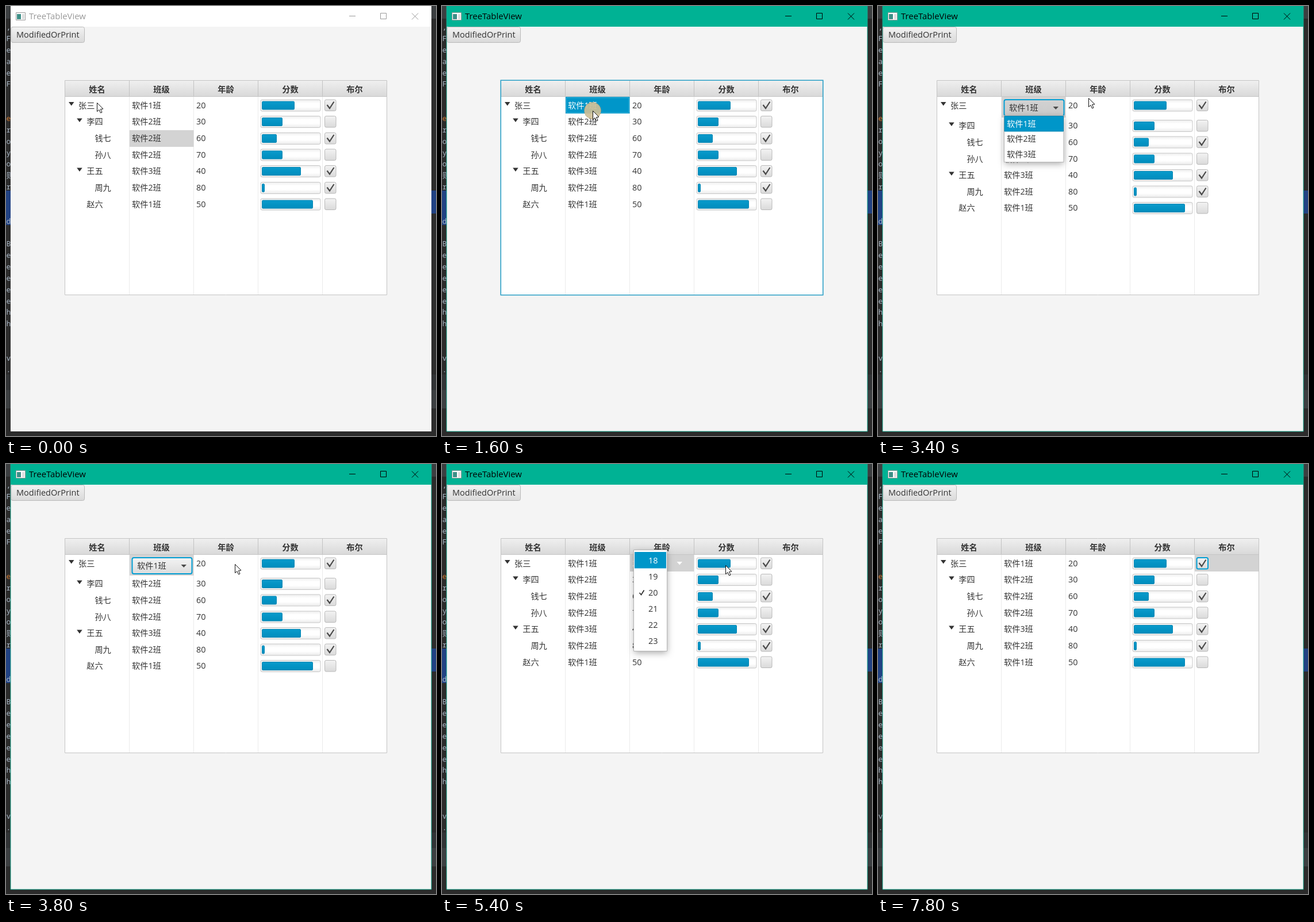
Animation of 748 by 748 pixels, one loop 8.4 s. Source, as an HTML page with a canvas:

```html
<!DOCTYPE html>
<html lang="zh-CN">
<head>
<meta charset="utf-8">
<title>TreeTableView</title>
<style>
html, body { margin: 0; width: 100%; height: 100%; overflow: hidden; background: #2b2b2b; }
canvas { display: block; }
</style>
</head>
<body>
<canvas id="stage" width="748" height="748"></canvas>
<script>
const g = document.getElementById('stage').getContext('2d');
const LOOP = 8400, STEP = 200;
const BLUE = '#0096c9', GREY = '#d3d3d3', INK = '#333';
const SANS = '"Open Sans", "Noto Sans CJK SC", "Noto Sans CJK", sans-serif';
const colX = i => 102.5 + i * 112;

const heads = ['姓名', '班级', '年龄', '分数', '布尔'];
// name, depth, has children, class, age, bar width, checked
const people = [
  ['张三', 0, 1, 1, 20, 57, 1],
  ['李四', 1, 1, 2, 30, 36, 0],
  ['钱七', 2, 0, 2, 60, 26, 1],
  ['孙八', 2, 0, 2, 70, 36, 0],
  ['王五', 1, 1, 3, 40, 68, 1],
  ['周九', 2, 0, 2, 80, 5, 1],
  ['赵六', 1, 0, 1, 50, 89, 0]
];

// Each scene holds from its start time until the next one
const scenes = [
  { at: 0, col: 1, row: 2, idle: true },
  { at: 200, col: 0, focus: true, press: true },
  { at: 400, col: 0, focus: true },
  { at: 600, col: 0, edit: 'field' },
  { at: 1600, col: 1, focus: true, press: true },
  { at: 1800, col: 1, focus: true },
  { at: 2200, col: 1, focus: true, edit: 'combo', press: true },
  { at: 2400, col: 1, focus: true, edit: 'combo' },
  { at: 2600, col: 1, edit: 'combo', open: true, press: true },
  { at: 2800, col: 1, edit: 'combo', open: true },
  { at: 3800, col: 1, edit: 'combo' },
  { at: 4000, col: 2, focus: true, press: true },
  { at: 4200, col: 2, focus: true },
  { at: 4400, col: 2, edit: 'choice', open: true },
  { at: 5800, col: 2, edit: 'choice' },
  { at: 6200, col: 4, focus: true },
  { at: 6800, col: 4, tick: true, off: true, press: true },
  { at: 7000, col: 4, tick: true, off: true },
  { at: 7400, col: 4, tick: true }
];

// Pointer stops: time, x, y
const stops = [
  [0, 158, 168], [800, 159, 169], [1200, 159, 169], [1600, 262, 182],
  [2200, 264, 185], [2800, 264, 186], [3400, 366, 160], [3800, 398, 174],
  [4600, 403, 178], [5000, 403, 178], [5800, 583, 174], [6200, 591, 174],
  [6400, 591, 174], [6800, 566, 174], [7400, 566, 175], [7600, 368, 446]
];

function rect(x, y, w, h, fill, stroke, r = 0, lw = 1) {
  g.beginPath();
  g.roundRect(x, y, w, h, r);
  if (fill) { g.fillStyle = fill; g.fill(); }
  if (stroke) { g.strokeStyle = stroke; g.lineWidth = lw; g.stroke(); }
}

function path(points, fill, stroke, lw = 1, close = false) {
  g.beginPath();
  for (const [x, y] of points) g.lineTo(x, y);
  if (close) g.closePath();
  if (fill) { g.fillStyle = fill; g.fill(); }
  if (stroke) { g.strokeStyle = stroke; g.lineWidth = lw; g.stroke(); }
}

// y is the middle of the line
function text(s, x, y, color = INK, size = 14.2, weight = 400, align = 'left', family = SANS) {
  g.font = `${weight} ${size}px ${family}`;
  g.textAlign = align;
  g.fillStyle = color;
  g.fillText(s, x, y + 5.2);
}

function shade(y, h, ...colors) {
  const s = g.createLinearGradient(0, y, 0, y + h);
  colors.forEach((c, i) => s.addColorStop(i / (colors.length - 1), c));
  return s;
}

function shadowed(x, y, w, h) {
  g.save();
  g.shadowColor = 'rgba(0,0,0,.35)';
  g.shadowBlur = 11;
  g.shadowOffsetY = 3;
  rect(x, y, w, h, '#fff');
  g.restore();
  rect(x, y, w, h, null, '#b4b4b4');
}

const triangle = (x, y, w, h, color) =>
  path([[x, y], [x + w, y], [x + w / 2, y + h]], color);

function drawEditor() {
  rect(0, 0, 748, 748, '#2b2b2b');
  rect(0, 0, 748, 22, '#3c3f41');
  rect(0, 321, 9, 60, '#214283');
  rect(739, 321, 9, 40, '#214283');
  rect(0, 641, 748, 27, '#313335');
  rect(0, 668, 748, 32, '#3c3f41');
  [...',FeaeF  eroyo则r  d BeeeeehH  v.'].forEach((c, i) =>
    text(c.toLowerCase() === 'h' ? 'h' : c, 0.5, 36 + i * 19.85, i === 8 ? '#cc7832' : '#a9b7c6',
      13, 400, 'left', '"Noto Sans Mono", "Noto Sans CJK SC", monospace'));
}

function drawWindow(idle) {
  const ink = idle ? '#999' : '#000';
  rect(8, 0, 732, 740, '#f4f4f4');
  rect(8, 0, 732, 36, idle ? '#fff' : '#00b294');
  if (!idle) path([[8, 0], [8, 740], [740, 740], [740, 0]], null, '#16a68d');

  rect(17.5, 11.5, 16, 13, '#fff', '#999');
  rect(19, 14, 7, 9, '#3d8f87');
  rect(28, 14, 4, 9, '#ddd');
  text('TreeTableView', 40, 18, ink, 14.9);
  path([[597, 17.5], [608, 17.5]], null, ink);
  rect(651.5, 12.5, 10, 10, null, ink);
  path([[706, 12.5], [717, 23.5]], null, ink);
  path([[717, 12.5], [706, 23.5]], null, ink);

  rect(9, 36.5, 127.5, 27, shade(36, 27, '#f3f3f3', '#dadada'), '#b9b9b9', 3);
  text('ModifiedOrPrint', 18, 50, INK, 14.5);
}

function drawTableFrame() {
  rect(102.5, 129.5, 560, 373, '#fff');
  rect(102.5, 129.5, 560, 28, shade(129, 28, '#f0f0f0', '#d9d9d9'));
  path([[102, 157.5], [662, 157.5]], null, '#c6c6c6');
  heads.forEach((h, i) => {
    text(h, colX(i) + 56, 144.5, INK, 14.2, 700, 'center');
    if (!i) return;
    path([[colX(i), 130], [colX(i), 157]], null, '#c2c2c2');
    path([[colX(i), 158], [colX(i), 502]], null, '#ebebeb');
  });
}

function drawCheckBox(y, on, focus) {
  rect(554.5, y - 9.5, 19.5, 19.5, shade(y - 9, 19, '#f2f2f2', '#dadada'),
    focus ? '#039ed3' : '#b9b9b9', 2.5, focus ? 2 : 1);
  if (on) path([[558.5, 172], [563, 178], [570.5, 166.5]].map(([x, v]) => [x, v + y - 172.5]),
    null, '#4a4a4a', 2.2);
}

function drawRow(person, i, s) {
  const [name, depth, parent, group, age, bar, on] = person;
  const tall = i && (s.edit === 'field' || s.edit === 'combo') ? 6.8 : 0;
  const y = Math.round((172.5 + i * 28.65 + tall) * 2) / 2;
  const active = i === (s.row || 0);
  const tint = c => active && s.col === c && (s.focus || s.edit) ? '#fff' : INK;
  if (active) {
    const h = s.edit === 'field' || s.edit === 'combo' ? 36 : 29;
    const top = Math.round(y - 14.5), x = colX(s.col) + .5;
    rect(x, top, 111.5, h, s.focus ? BLUE : GREY);
    if (s.focus) rect(x + 1.5, top + 1.5, 108.5, h - 3, null, '#38b0d8');
  }
  const nameX = 126 + depth * 14.2;
  if (parent) triangle(nameX - 17, y - 5.5, 9.5, 6.5, INK);
  if (!(active && s.edit === 'field')) text(name, nameX, y, tint(0));
  if (!(active && s.edit === 'combo')) text(`软件${group}班`, 219, y, tint(1));
  text(age, 331, y, tint(2), 14.4);

  rect(443, y - 9.5, 104, 20, shade(y - 10, 20, '#ececec', '#fff', '#fff', '#ececec'), '#c6c6c6', 2.5);
  rect(445.5, y - 6.5, bar - 1, 14, shade(y - 7, 14, '#0a9bcc', '#008dbd'), '#0586b3', 1.5);
  drawCheckBox(y, active ? on && !s.off : on, active && s.tick);
}

function drawField() {
  rect(126.5, 163, 85, 28, '#fff', '#039ed3', 3, 2);
  rect(135, 167, 29, 20, BLUE);
  text('张三', 135.5, 177, '#fff');
}

function drawCombo(s) {
  const [a, b] = s.open ? ['#d2d2d2', '#cacaca'] : ['#f4f4f4', '#dcdcdc'];
  rect(219.5, 163, 104, 28, shade(163, 28, a, b), s.focus ? '#b5b5b5' : '#039ed3', 3, s.focus ? 1 : 2);
  text('软件1班', 228, 177);
  triangle(304.5, 175, 9.5, 5, '#4a4a4a');
  if (!s.open) return;
  shadowed(219.5, 190.5, 103.5, 81);
  rect(220, 191.5, 102.5, 26.5, BLUE, '#0584b0');
  for (let i = 0; i < 3; i++) text(`软件${i + 1}班`, 224, 205 + i * 26.2, i ? INK : '#fff');
}

function drawChoice(s) {
  triangle(408.5, 170, 9.5, 5.5, '#fff');
  if (!s.open) return;
  shadowed(333.5, 149.5, 58, 176);
  rect(335, 153, 55, 28.5, BLUE);
  for (let i = 0; i < 6; i++) text(18 + i, 359, 168 + i * 28.05, i ? INK : '#fff', 14.4);
  path([[343.5, 224], [346.5, 227.5], [351.5, 219.5]], null, '#333', 1.8);
}

function pointerAt(t) {
  const i = stops.findIndex(p => p[0] > t);
  if (i < 0) return stops.at(-1).slice(1);
  const [a, ax, ay] = stops[i - 1], [b, bx, by] = stops[i];
  const k = (t - a) / (b - a);
  return [Math.round(ax + (bx - ax) * k), Math.round(ay + (by - ay) * k)];
}

function drawPointer(t, press) {
  if (t >= 7800) return;
  const [x, y] = pointerAt(t);
  if (press) {
    g.beginPath();
    g.arc(x, y, 14.5, 0, Math.PI * 2);
    g.fillStyle = 'rgba(205,190,150,.92)';
    g.fill();
    g.setLineDash([2, 2]);
    g.strokeStyle = '#a3946c';
    g.lineWidth = 1;
    g.stroke();
    g.setLineDash([]);
  }
  const arrow = [[0, 0], [0, 15], [3.5, 12], [6, 17.5], [8.5, 16.5], [6, 11], [10.5, 10.5]];
  path(arrow.map(([dx, dy]) => [x + .5 + dx, y + .5 + dy]), '#fff', '#111', 1, true);
}

function draw(now) {
  const t = Math.floor(now % LOOP / STEP) * STEP;
  const s = scenes.findLast(scene => scene.at <= t);
  drawEditor();
  drawWindow(s.idle);
  drawTableFrame();
  people.forEach((p, i) => drawRow(p, i, s));
  if (s.focus) rect(102.25, 129.25, 560.5, 373.5, null, '#2a9fc6', 0, 1.6);
  else rect(102.5, 129.5, 560, 373, null, '#c4c4c4');
  if (s.edit === 'field') drawField();
  if (s.edit === 'combo') drawCombo(s);
  if (s.edit === 'choice') drawChoice(s);
  drawPointer(t, s.press);
}

const start = performance.now();
function tick() {
  draw(performance.now() - start);
  requestAnimationFrame(tick);
}
tick();
</script>
</body>
</html>
```
